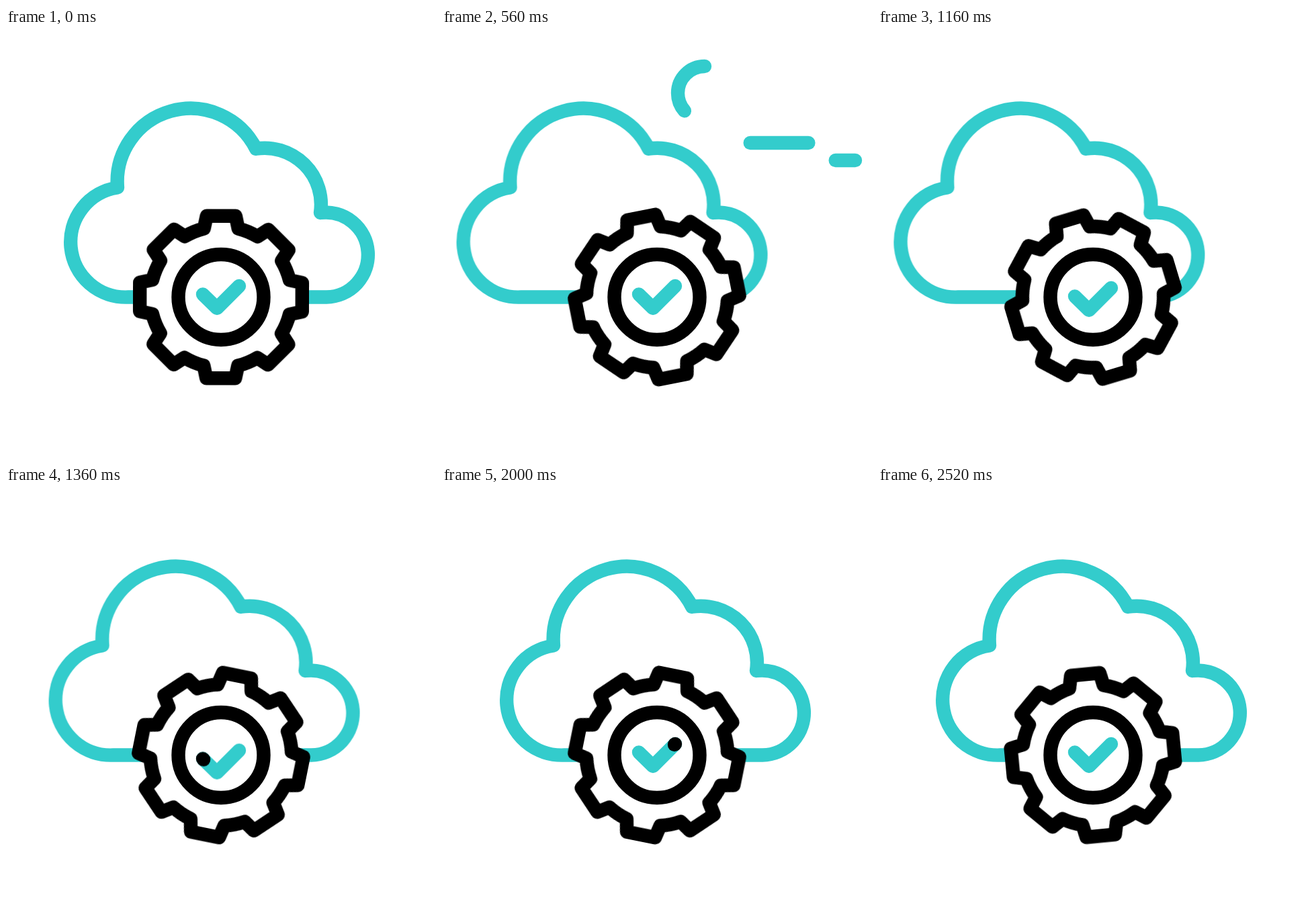
Animation, 640 px wide and 640 px high, one loop 2560 ms. Source, as an HTML page:

```html
<!DOCTYPE html>
<html lang="en">
<head>
<meta charset="utf-8">
<title>Cloud settings</title>
<style>
  @property --head { syntax: "<number>"; inherits: false; initial-value: 0; }
  @property --tail { syntax: "<number>"; inherits: false; initial-value: 0; }

  html, body { margin: 0; width: 100%; height: 100%; overflow: hidden; background: #fff; }
  svg { display: block; width: 100%; height: 100%; }

  :root {
    --loop: 2560ms;
    --ease: cubic-bezier(.333, 0, .667, 1);
  }

  path, circle {
    fill: none;
    stroke: #3cc;
    stroke-width: 20.4;
    stroke-linecap: round;
    stroke-linejoin: round;
  }
  .dark { stroke: #000; }
  #gear { fill: #fff; }

  #gear {
    transform-origin: 320px 400.5px;
    animation: spin var(--loop) linear infinite;
  }
  #cloud { animation: sway var(--loop) var(--ease) infinite; }
  #check { animation: bounce var(--loop) var(--ease) infinite; }

  /* A dash that runs along its path: the head leads, the tail follows. */
  .run {
    --delay: calc(var(--at) * 40ms);
    opacity: 0;
    stroke-dasharray: calc((var(--head) - var(--tail)) * 1px) 300px;
    stroke-dashoffset: calc(var(--tail) * -1px);
    animation:
      head var(--loop) var(--ease) var(--delay) infinite,
      tail var(--loop) var(--ease) var(--delay) infinite,
      show var(--loop) step-end var(--delay) infinite;
  }

  @keyframes spin { to { transform: rotate(360deg); } }

  @keyframes sway {
    0%, 6.25% { transform: translateX(0); }
    21.875% { transform: translateX(-64.5px); }
    32.8125% { transform: translateX(-51.5px); }
    43.75% { transform: translateX(-64.5px); }
    59.375%, 100% { transform: translateX(0); }
  }

  @keyframes bounce {
    0%, 42.1875% { transform: translateY(0); }
    51.5625% { transform: translateY(11px); }
    60.9375% { transform: translateY(-8px); }
    70.3125%, 100% { transform: translateY(0); }
  }

  @keyframes head {
    0% { --head: 0; }
    18.75%, 100% { --head: 100; }
  }
  @keyframes tail {
    0%, 9.375% { --tail: 0; }
    28.125%, 100% { --tail: 100; }
  }
  @keyframes show {
    0% { opacity: 0; }
    .9% { opacity: 1; }
    28.1%, 100% { opacity: 0; }
  }
</style>
</head>
<body>
<svg viewBox="0 0 640 640">
  <path class="run" style="--at: .15" pathLength="100" d="M600 137H391a40 40 0 0 1 0-80"/>
  <path class="run" style="--at: 3" pathLength="100" d="M600 171H456"/>
  <path class="run" style="--at: 10.6" pathLength="100" d="M615 197H467"/>

  <path id="cloud" d="M182 400.5A82 82 0 0 1 166 237.5A109 109 0 0 1 372 179.7A84 84 0 0 1 468 275A63 63 0 1 1 477 400.5Z"/>

  <path id="gear" class="dark"/>
  <circle class="dark" cx="320" cy="400.5" r="63.5"/>

  <g id="check">
    <path d="M293 396.5L314 417L347 384"/>
    <path class="run dark" style="--at: 33" pathLength="100" d="M293 396.5L314 417L347 384"/>
  </g>
</svg>
<script>
  // Half of one tooth, measured from the gear centre; mirrored and turned eight times.
  const tooth = [[-25.5, -102], [-21.5, -120.8], [21.5, -120.8], [25.5, -102]];
  const radius = Math.hypot(...tooth[0]);

  const turn = ([x, y], a) => {
    const c = Math.cos(a), s = Math.sin(a);
    return `${(320 + x * c - y * s).toFixed(2)} ${(400.5 + x * s + y * c).toFixed(2)}`;
  };

  let d = "";
  for (let i = 0; i < 8; i++) {
    const [first, ...rest] = tooth.map(p => turn(p, i * Math.PI / 4));
    d += (i ? `A${radius} ${radius} 0 0 1 ` : "M") + first;
    d += rest.map(p => "L" + p).join("");
  }
  d += `A${radius} ${radius} 0 0 1 ${turn(tooth[0], 0)}Z`;
  document.getElementById("gear").setAttribute("d", d);
</script>
</body>
</html>
```
